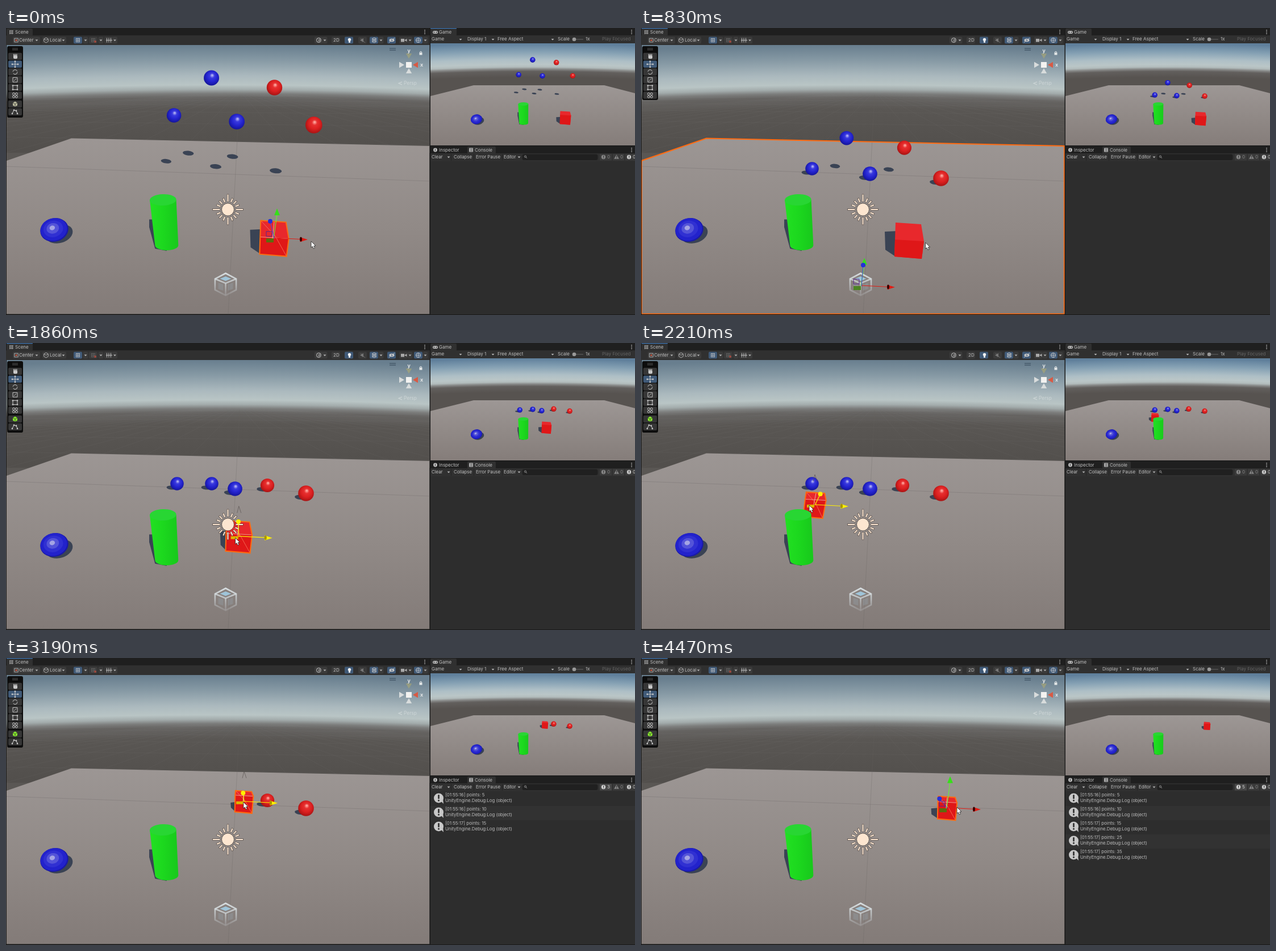
Recreate the animation shown at these times as an HTML page with a canvas. Size 1107 by 506 pixels, loop 4.54 s.

```html
<!DOCTYPE html>
<html lang="en">
<head>
<meta charset="utf-8">
<title>Scene editor</title>
<style>
html, body { margin: 0; width: 100%; height: 100%; overflow: hidden; background: #1a1a1a; }
canvas { display: block; }
</style>
</head>
<body>
<canvas id="stage" width="1107" height="506"></canvas>
<script>
const c = document.getElementById('stage').getContext('2d');
const LOOP = 4540, STEP = 69.3;
const SHADOW = '#3a4354', ORANGE = '#ff6a10', YELLOW = '#fff000', ICON = '#c8c8c8', ACTIVE = '#405a78';
const RED = ['#ffa8a0', '#e63030', '#dc2020', '#a81414'], BLUE = ['#b4b4f4', '#3a3ade', '#2424d0', '#15159a'];

// ---------- helpers ----------
const mix = (a, b, p) => a + (b - a) * p;
const clamp = (v, lo, hi) => Math.min(hi, Math.max(lo, v));

function rect(x, y, w, h, fill, r = 0) {
  c.fillStyle = fill;
  c.beginPath();
  c.roundRect(x, y, w, h, r);
  c.fill();
}
function trace(pts, closed) {
  c.beginPath();
  pts.forEach(([x, y]) => c.lineTo(x, y));
  if (closed) c.closePath();
}
function poly(pts, fill) {
  trace(pts, true);
  c.fillStyle = fill;
  c.fill();
}
function line(pts, color, w = 1, closed = false) {
  trace(pts, closed);
  c.strokeStyle = color;
  c.lineWidth = w;
  c.stroke();
}
const seg = (x0, y0, x1, y1, color, w) => line([[x0, y0], [x1, y1]], color, w);
function oval(x, y, rx, ry, fill, angle = 0) {
  c.fillStyle = fill;
  c.beginPath();
  c.ellipse(x, y, rx, ry, angle, 0, 7);
  c.fill();
}
function ring(x, y, r, color, w = 1) {
  c.strokeStyle = color;
  c.lineWidth = w;
  c.beginPath();
  c.arc(x, y, r, 0, 7);
  c.stroke();
}
// Regular polygon points, first one straight up.
const ngon = (n, x, y, rx, ry = rx, turn = 0) => Array.from({ length: n }, (_, i) => {
  const a = (i + turn) * 2 * Math.PI / n;
  return [x + Math.sin(a) * rx, y - Math.cos(a) * ry];
});
function text(s, x, y, color = '#c0c0c0', size = 8, weight = 400) {
  c.font = `${weight} ${size}px Inter, sans-serif`;
  c.fillStyle = color;
  c.fillText(s, x, y);
}
const caret = (x, y) => poly(ngon(3, x, y, 2.8, 1.8, 1.5), '#b4b4b4');
function dots(x, y) {
  for (let i = -1; i < 2; i++) rect(x - .7, y - .7 + i * 3, 1.5, 1.5, '#c4c4c4');
}
function track(k, keys) {
  const i = keys.findIndex(q => q[0] > k);
  if (i < 0) return keys[keys.length - 1].slice(1);
  const a = keys[i - 1], b = keys[i], p = (k - a[0]) / (b[0] - a[0]);
  return a.slice(1).map((v, j) => mix(v, b[j + 1], p));
}
function clipped(x, y, w, h, draw) {
  c.save();
  c.beginPath();
  c.rect(x, y, w, h);
  c.clip();
  draw();
  c.restore();
}
function shade(g, cols) {
  cols.forEach((col, i) => g.addColorStop(i / (cols.length - 1), col));
  return g;
}
const vertical = (y0, y1, ...cols) => shade(c.createLinearGradient(0, y0, 0, y1), cols);

// Sky over ground, slightly arched; sky is the height of the sky.
function backdrop(x, y, w, h, sky, cols) {
  const R = w * 12, end = sky * 1.25, cx = x + w / 2, cy = y + R;
  const stops = [0, .3, .6, .78, .87, .95, 1.03, 1.25];
  const g = c.createRadialGradient(cx, cy, R - end, cx, cy, R);
  stops.forEach((d, i) => g.addColorStop(1 - d / 1.25, cols[i]));
  rect(x, y, w, h, g);
}

// ---------- solids ----------
function ball(x, y, r, cols) {
  const g = c.createRadialGradient(x + r * .1, y - r * .35, r * .05, x + r * .05, y - r * .1, r * 1.1);
  cols.forEach((col, i) => g.addColorStop([0, .25, .6, 1][i], col));
  oval(x, y, r, r, g);
}
function egg(x, y, s) {
  oval(x + 9 * s, y + 7 * s, 24 * s, 16 * s, SHADOW, -.3);
  ['#1919a8', '#2222cc', '#3030d2', '#5454d8', '#a4a4e4'].forEach((col, i) => {
    const r = (i ? 30 - i * 6.3 : 25) * s;
    oval(x - i * .9 * s, y - i * .9 * s, r, r * .83, col, -.25);
  });
}
// Top centre (x, y), top radii, height, sideways lean of the foot.
function cylinder(x, y, rx, ry, h, lean) {
  const foot = y + h, fx = x + lean, fr = rx * .88;
  poly([[x - rx - 1, y + h * .43], [x - rx - 1, y + h * .6], [fx - fr, foot + ry * .6], [fx, foot + ry], [fx, y + h * .43]], SHADOW);
  c.beginPath();
  c.moveTo(x - rx, y);
  c.lineTo(x + rx, y);
  c.ellipse(fx, foot, fr, ry * .9, 0, 0, Math.PI);
  c.closePath();
  c.fillStyle = shade(c.createLinearGradient(x - rx, 0, x + rx, 0), ['#22e022', '#1cd81e', '#18ca1c']);
  c.fill();
  oval(x, y, rx, ry, '#28d633', -.03);
}
// The top face gets thinner with distance (near runs from 0 to 1).
function cube(x, y, size, near, skew, reach, selected) {
  const s = size / 52, at = (a, b) => [x + (a - b * skew) * s, y + b * s], ridge = mix(-19, -2, near);
  const [tl, tr, r, br, bl, l] = [at(-24, -32), at(21, -29), at(26, ridge + 3), at(22, 32), at(-26, 28), at(-25, ridge)];
  poly([at(-26 - reach, mix(2, -16, near)), at(-22, mix(0, -17, near)), at(-24, 28), at(-25 - reach, 16)], SHADOW);
  poly([tl, tr, r, br, bl, l], '#e8282c');
  poly([l, r, br, bl], '#df1718');
  if (!selected) return;
  line([l, r], '#f4b8a8', .8);
  line([tl, at(2, -4), br], '#ff9a78', .6);
  line([at(0, -30), at(-3, 0)], '#f4c8b8', .8);
  line([tl, tr, r, br, bl, l], ORANGE, 2, true);
}

// ---------- handles ----------
function arrowX(x, y, col, base) {
  seg(x, y - 1, x + 48, y + 1.5, col, 1.2);
  poly(ngon(3, x + 50, y + 2, 9, 5, .75), col);
  oval(x + 47, y + 1.5, 2, 4, base);
}
function handles(x, y, dx, dy) {
  const tip = y * 1.036 - 66;
  seg(x - 1, y, x + 5, tip + 10, '#6ee83a', 1.2);
  poly([[x, tip + 12], [x + 5, tip], [x + 10, tip + 12]], '#35e019');
  arrowX(x, y, '#e01c14', '#300');
  seg(x, y, x + dx, y + dy, '#3848e8');
  oval(x + dx, y + dy, 4, 4, '#2530d8');
  line(ngon(4, x - 9, y - 8, 7, 6, .5), '#5a2490', 1, true);
  rect(x - 14, y, 13, 7, 'rgba(60,130,10,.8)');
}
function dragHandles(x, y, dx, dy) {
  line([[x - 3, y - 42], [x, y - 54], [x + 4, y - 42]], 'rgba(90,85,82,.7)');
  arrowX(x, y, YELLOW, '#a89400');
  seg(x, y, x + dx, y + dy, YELLOW, 1.2);
  oval(x + dx, y + dy, 4, 4, YELLOW);
  rect(x - 14, y - 1, 13, 5, '#dcb400');
}
function cursor(x, y) {
  const p = [[0, 0], [0, 11], [2.5, 9], [4.3, 13], [6.4, 12], [4.7, 8.2], [8, 8]].map(([a, b]) => [x + a, y + b]);
  poly(p, '#fff');
  line(p, '#222', .8, true);
}

// ---------- motion ----------
// Resting place, drop height in pixels, and the step at which the cube collects it.
const balls = [
  { col: BLUE, x: 362, y: 248, drop: 160, hit: 40 },
  { col: BLUE, x: 301, y: 248, drop: 94, hit: 37 },
  { col: RED, x: 460, y: 251, drop: 146, hit: 47 },
  { col: BLUE, x: 403, y: 257, drop: 92, hit: 43 },
  { col: RED, x: 528, y: 265, drop: 94, hit: 51 }
];
const cubePath = [[3, 472, 375], [24, 472, 375], [32, 306, 286], [36, 302, 255], [40, 335, 251], [53, 517, 257], [56, 539, 265]];
const mouseOffset = [[0, 65, 5], [7, 49, 2], [19, 0, 5], [32, -10, 0], [40, 0, 1], [56, -3, -1]];

const cubeAt = k => k < 3 ? [472, 371 + 4 * (k / 3) ** 2] : track(k, cubePath);

// Ground point of the scene view as seen in the game view.
const project = (x, y) => [
  927 + (x - 362 + (y - 250) * .05) * (.375 + (y - 250) * .001),
  117 + (y - (x - 360) * .05 - 248) * .354
];

function fallingBalls(k) {
  return balls.filter(b => k < b.hit).map(({ col, x, y, drop, hit }) => {
    const fall = 1.165 * Math.sqrt(drop), up = drop * (1 - Math.min(1, k / fall) ** 2);
    const dx = up * (x - 365) * .0009;
    const shadow = [x - 10 - up * (x - 240) * .0016, y + 7 - up * .215];
    const [gx, gy] = project(x, y);
    return { col, shadow, x: x + dx, y: y - up, r: 12 + (y - 250) * .12 + up * .011, gx: gx + dx * .38, gy: gy - up * .38 };
  });
}

// ---------- scene view ----------
const PLANE = [[1, 234], [115, 194.5], [745, 208], [745, 504], [1, 504]];

function grid() {
  const col = 'rgba(150,148,146,.11)';
  for (let n = -14; n <= 14; n++) seg(411 + n * 6, 118, 391 + n * 370, 505, n ? col : 'rgba(100,96,94,.4)', .7);
  for (let i = 0, y = 122; i < 6; i++, y += 3 + i * i) seg(0, y, 746, y + (y - 100) * .16, col, .7);
  seg(0, 244, 746, 270, 'rgba(110,105,103,.5)', .7);
}
function sun(x, y) {
  for (const [col, grow] of [['rgba(70,62,58,.75)', .8], ['#fde6d0', 0]]) {
    for (let i = 0; i < 16; i++) {
      const a = i * Math.PI / 8, r = (i % 4 ? 21 : 26.5) + grow, q = 14 - grow, s = Math.sin(a), d = Math.cos(a);
      seg(x + d * q, y + s * q, x + d * r, y + s * r, col, 2 + grow * 1.6);
    }
    oval(x, y, 10.5 + grow, 10.5 + grow, col);
  }
}
function boxIcon(x, y) {
  const g = vertical(432, 474, 'rgba(225,233,236,.9)', 'rgba(205,212,215,.65)', 'rgba(180,182,184,.2)');
  const hex = ngon(6, x, y, 21.5, 19.5);
  poly(ngon(4, x, y - 10, 10, 4), '#9fc4d8');
  for (const d of [-1, 1]) poly([[x + 13 * d, y - 3], [x + 4 * d, y], [x + 4 * d, y + 11], [x + 13 * d, y + 8]], 'rgba(150,162,170,.35)');
  line(hex, g, 2.6, true);
  line([hex[5], [x, y - 2], hex[1]], g, 2.6);
  line([[x, y - 2], hex[3]], g, 2.6);
}
function compass(x, y) {
  const w = '#d8dcdc', pale = 'rgba(225,230,230,.6)';
  const cone = (dx, dy, turn, col) => poly(ngon(3, x + dx, y + dy, 6, 6, turn), col);
  cone(0, -17, 1.5, 'rgba(190,180,100,.45)');
  cone(-14, 0, .75, w);
  cone(0, 12, 0, w);
  cone(13, 0, 2.25, '#d85a44');
  rect(x - 5, y - 5, 10, 10, '#f2f2f0');
  text('y', x - 2.5, y - 25, '#eee', 9, 600);
  text('x', x + 20, y, '#eee', 9, 600);
  rect(x + 18.5, y - 21.5, 5, 4, '#e4e8e8');
  ring(x + 21, y - 22, 1.6, '#e4e8e8');
  for (const d of [0, 3]) seg(x - 34, y - 29 + d, x - 23, y - 29 + d, '#35485a', 1.2);
  line([[x - 12, y + 30], [x - 18, y + 32.5], [x - 12, y + 35]], pale, 1.2);
  text('Persp', x - 9, y + 32.5, pale, 8.4);
}
function toolStrip(short, active) {
  const x = 16, rowY = i => 50.2 + i * 13.7 + (i > 5 ? 1.8 : 0);
  const knobs = pts => pts.forEach(p => oval(...p, 1.3, 1.3, ICON));
  rect(2, 32, 28, short ? 95 : 126, '#0d0d0d', 3);
  for (const y of [36, 38.5]) seg(11, y, 21, y, '#555');
  for (let i = 0; i < (short ? 6 : 8); i++) rect(4, rowY(i) - 6.5, 24, 12.6, i == 1 ? ACTIVE : '#363636', 2);
  rect(x - 3, rowY(0) - 2, 7, 6, ICON, 2);
  for (let i = 0; i < 4; i++) seg(x - 2.3 + i * 1.7, rowY(0), x - 2.6 + i * 1.9, rowY(0) - 4.5, ICON, 1.1);
  const cross = ngon(4, x, rowY(1), 5);
  line([cross[0], cross[2]], ICON);
  line([cross[1], cross[3]], ICON);
  knobs(cross);
  c.setLineDash([10, 3]);
  ring(x, rowY(2), 4, ICON);
  c.setLineDash([]);
  line(ngon(4, x, rowY(3), 5.6, 5.6, .5), ICON, 1, true);
  seg(x - 2, rowY(3) + 2, x + 2, rowY(3) - 2, ICON);
  const frame = ngon(4, x, rowY(4), 5.6, 5, .5);
  line(frame, ICON, 1, true);
  knobs(frame);
  ngon(4, x, rowY(5), 3.5, 3.5, .5).forEach(p => ring(...p, 2, ICON));
  if (short) return;
  const hex = ngon(6, x, rowY(6), 4.6);
  poly(hex, active ? '#86e82c' : '#b8b89c');
  line([hex[5], [x, rowY(6)], hex[1]], '#333', .8);
  line([[x, rowY(6)], hex[3]], '#333', .8);
  const bend = [[x - 5, rowY(7) + 3], [x - 2, rowY(7) - 3], [x + 2, rowY(7) - 2], [x + 4, rowY(7) + 3]];
  line(bend, ICON);
  knobs(bend);
}
function sceneView(k, t) {
  const planeOn = k >= 3 && k < 13, dragging = k >= 25 && t < 4010;
  backdrop(1, 30, 745, 475, 90, ['#687e8e', '#879aa5', '#abb9be', '#b9c5c5', '#a3acac', '#7c7d7c', '#656361', '#5a5754']);
  rect(1, 140, 745, 80, vertical(140, 215, 'rgba(82,79,76,0)', '#524f4c'));
  poly(PLANE, vertical(195, 505, '#9c9694', '#918a87', '#837b78'));
  grid();
  egg(85, 356, 1);
  const [x, y] = cubeAt(k), near = clamp((y - 255) / 120, 0, 1);
  const drawCube = () => cube(x, y, y * .16 - 8, near, clamp((370 - x) * .0015, 0, .1), clamp((x - 320) * .12, 0, 17), !planeOn);
  if (planeOn) line(PLANE, ORANGE, 2.2, true);
  const live = fallingBalls(k);
  live.forEach(b => oval(...b.shadow, b.r * .72, b.r * .3, SHADOW, .1));
  live.forEach(b => ball(b.x, b.y, b.r, b.col));
  if (y < 330) drawCube();
  cylinder(276.3, 303, 23.3, 10, 80, 6.5);
  if (y >= 330) drawCube();
  boxIcon(386.5, 452);
  sun(390.5, 320);
  if (planeOn) handles(388, 455, 3, -37);
  else (dragging ? dragHandles : handles)(x, y, (402 - x) * .1, 16 - y * .125);
  compass(709, 65);
  toolStrip(planeOn, k >= 13);
  const [mx, my] = track(k, mouseOffset);
  if (t >= 4470) cursor(556, 263);
  else cursor(x + mx, y + my);
}

// ---------- game view ----------
function gameView(k) {
  backdrop(747, 27, 360, 180, 48, ['#5f7f9b', '#84a0b3', '#aebfc6', '#bac6c7', '#b2bcbc', '#858685', '#625f5d', '#575350']);
  poly([[747, 120], [823, 101], [1053, 101], [1107, 115], [1107, 207], [747, 207]], vertical(101, 207, '#9d9795', '#918a87', '#857d7a'));
  const [x, y] = cubeAt(k), [gx, gy] = project(x, y), near = clamp((y - 255) / 120, 0, 1);
  const drawCube = () => cube(gx, gy, mix(11, 20, near), near * .3, 0, 17, false);
  const live = fallingBalls(k);
  live.forEach(b => oval(...project(...b.shadow), 4, 1.4, SHADOW, .1));
  live.forEach(b => ball(b.gx, b.gy, 4.8, b.col));
  if (y < 330) drawCube();
  egg(828, 161, .41);
  cylinder(910.3, 134, 9, 3, 34, .8);
  if (y >= 330) drawCube();
}

// ---------- panels ----------
// Tab strip, its open tab and the toolbar below.
function bar(x, y, w, tabX, tabW, toolH, focused) {
  rect(x, y, w, 14, '#1f1f1f');
  rect(tabX, y + 1, tabW, 13, '#303030', 2);
  if (focused) rect(tabX, y, tabW, 1.2, '#3a72b0');
  rect(x, y + 13, w, toolH, '#303030');
}
function lattice(x, y, gap, size, color) {
  for (let i = 0; i < 3; i++) {
    seg(x + i * gap + .5, y, x + i * gap + .5, y + size, color, .8);
    seg(x, y + i * gap + .5, x + size, y + i * gap + .5, color, .8);
  }
}
function sceneBars(focused) {
  const y = 21.5;
  bar(0, 0, 746, 1, 46, 17, focused);
  lattice(6, 4, 2.5, 7, '#aaa');
  text('Scene', 16, 7.3);
  dots(737, 7);
  const chip = (x, w, on) => rect(x, 15.5, w, 12, on ? ACTIVE : '#3b3b3b', 2);
  chip(12, 48);
  chip(64, 42);
  for (const x of [127, 604, 648, 679, 726]) chip(x - 8, 15, true);
  for (const x of [154, 181, 551, 581, 628, 700]) chip(x - 8, 15);
  for (const x of [140, 167, 191.5, 561, 660, 711, 738]) chip(x - 4.5, 9);
  for (const x of [54, 101, 140, 167, 191.5, 561, 660, 711, 738]) caret(x, y);
  line(ngon(4, 18, y, 4.6, 4.6, .5), '#bbb', .9, true);
  oval(18, y, 1.5, 1.5, '#d86048');
  text('Center', 23, 21.7);
  line(ngon(6, 70.5, y, 4.4), '#bbb', .9, true);
  line([[67, 19.5], [70.5, y], [74, 19.5]], '#bbb', .9);
  text('Local', 77, 21.7);
  lattice(123, 18, 3, 7, ICON);
  lattice(150, 18, 3, 7, '#666');
  oval(157, 24, 2, 2, '#a04a40');
  for (let i = 0; i < 3; i++) seg(177.5 + i * 3.5, 17.5, 177.5 + i * 3.5, 25.5, ICON, .9);
  seg(176, y, 187, y, ICON, .9);
  ring(550.5, y, 4, ICON);
  oval(552, 22, 2.8, 3, '#777');
  text('2D', 576, 21.7);
  oval(604.5, 20.5, 2.7, 2.8, '#f0f0f0');
  rect(603, 23, 3, 2.8, '#f0f0f0');
  poly(ngon(3, 627, y, 4, 4, 2.25), '#777');
  seg(624, 18, 632, 26, '#777', .8);
  for (const d of [-2.5, 0, 2.5]) line(ngon(4, 648, y + d, 4, 2), ICON, .9, true);
  oval(679, y, 4.5, 2.8, ICON);
  oval(679, y, 1.5, 1.5, ACTIVE);
  seg(674, 25.5, 684, 17.5, ICON);
  rect(695, 19, 6, 5.5, '#aaa');
  poly(ngon(3, 704, y, 3, 3, 2.25), '#aaa');
  ring(725.5, y, 4, ICON);
  seg(721, y, 730, y, ICON, .8);
  seg(725.5, 17, 725.5, 26, ICON, .8);
}
function gameBars(focused) {
  bar(747, 0, 360, 747, 46, 14, focused);
  rect(751, 5, 9, 5, '#bbb', 2.5);
  for (const x of [753.5, 757.5]) oval(x, 7.5, 1, 1, '#303030');
  text('Game', 762, 7.3);
  dots(1101, 7);
  for (const [s, x] of [['Game', 749], ['Display 1', 812], ['Free Aspect', 865], ['Scale', 971], ['1x', 1020]]) text(s, x, 20);
  text('Play Focused', 1049, 20, '#666');
  for (const x of [800, 857, 962]) caret(x, 20);
  seg(997, 20, 1016, 20, '#5c5c5c', 1.2);
  oval(1000, 20, 3.3, 3.3, '#999');
}
function badge(x, w, count, color, triangle) {
  rect(x, 222, w, 11.5, count ? '#484848' : '#3a3a3a');
  if (triangle) poly(ngon(3, x + 6.5, 228.3, 5), color);
  else oval(x + 6.5, 227.5, 3.7, 3.7, color);
  text('!', x + 5.5, 227.8, '#333', 6.5, 800);
  text(count, x + 13, 227.7, color);
}
function consolePanel(logs) {
  rect(747, 208, 360, 297, '#2d2d2d');
  bar(747, 208, 360, 812, 50, 14);
  oval(755.5, 215, 3.4, 3.4, '#c0c0c0');
  text('i', 754.5, 215.2, '#222', 6, 700);
  text('Inspector', 762, 215.2);
  rect(815, 211.5, 7, 7, '#b8b8b8', 1);
  for (const y of [213, 215, 217]) seg(816.5, y, 821, y, '#333', .7);
  text('Console', 825, 215.2);
  dots(1101, 215);
  for (const [s, x] of [['Clear', 749], ['Collapse', 788], ['Error Pause', 827], ['Editor', 876]]) text(s, x, 227.7, '#c0c0c0', 7.8);
  for (const x of [779, 903]) caret(x, 227.5);
  for (const x of [783.5, 823.5, 873.5]) seg(x, 222, x, 234, '#222', .8);
  rect(908.5, 222.5, 133, 10.5, '#202020', 3);
  ring(914, 226.6, 1.6, '#aaa', .8);
  seg(915.2, 227.9, 917, 229.6, '#aaa', .9);
  badge(1045, 21, logs, logs ? '#d0d0d0' : '#858585');
  badge(1068, 20, 0, '#858585', true);
  badge(1090, 17, 0, '#c8c8c8');

  [5, 10, 15, 25, 35].slice(0, logs).forEach((points, i) => {
    const y = 236 + i * 25;
    rect(747, y, 360, 25, i % 2 ? '#323232' : '#2d2d2d');
    oval(761.5, y + 11, 8.5, 8.5, ICON);
    poly([[765, y + 16], [770, y + 21], [769, y + 13]], ICON);
    rect(760.2, y + 5, 2.6, 7.5, '#2d2d2d', 1);
    oval(761.5, y + 15.3, 1.5, 1.5, '#2d2d2d');
    text(`[01:55:${i < 2 ? 16 : 17}] points: ${points}`, 773, y + 5.7, '#bcbcbc', 7.8);
    text('UnityEngine.Debug:Log (object)', 773, y + 15.3, '#bcbcbc', 7.8);
  });
}

function draw(now) {
  const t = now % LOOP, k = Math.floor(t / STEP + .25);
  c.textBaseline = 'middle';
  rect(0, 0, 1107, 506, '#191919');
  clipped(1, 30, 744.5, 474.5, () => sceneView(k, t));
  clipped(747, 27, 360, 180, () => gameView(k));
  sceneBars(k >= 3);
  gameBars(k < 3);
  consolePanel(balls.filter(b => b.hit < k).length);
}
const start = performance.now();
(function frame() {
  draw(performance.now() - start);
  requestAnimationFrame(frame);
})();
</script>
</body>
</html>
```
